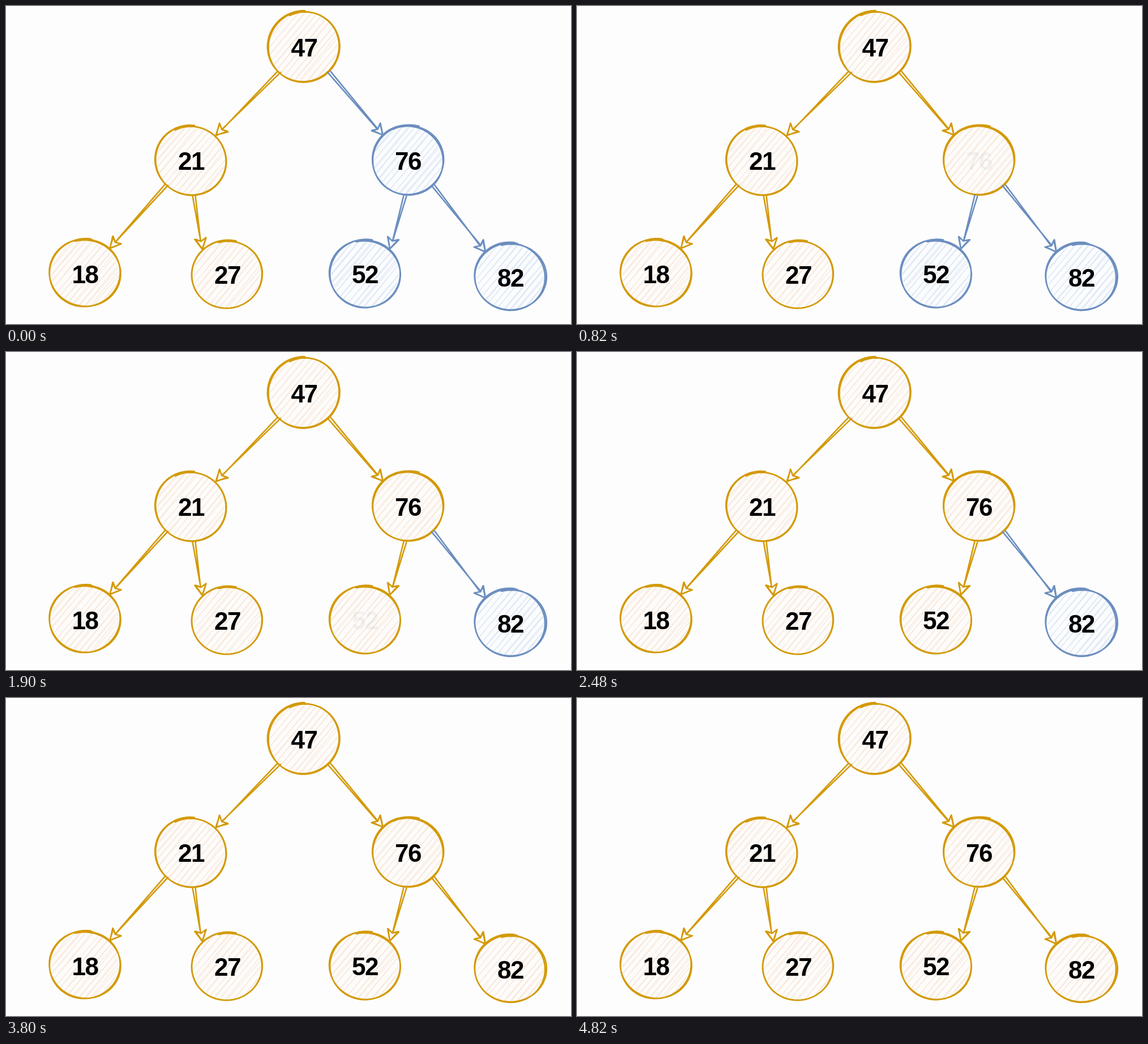
Recreate the animation shown at these times as an HTML page. Size 998 by 561 pixels, loop 4.84 s.

```html
<!DOCTYPE html>
<html lang="en">
<head>
<meta charset="utf-8">
<title>Tree traversal</title>
<style>
  html, body { margin: 0; width: 100%; height: 100%; overflow: hidden; background: #fdfdfd; }
  svg { display: block; width: 100%; height: 100%; }
  g { --line: #6c8ebf; --fill: #fbfcfd; --hatch: #dde7f6; }
  g.on { --line: #d39a08; --fill: #fdfcfb; --hatch: #f9e8da; }
  path { fill: none; stroke-linecap: round; stroke-linejoin: round; }
  ellipse { fill: var(--fill); }
  .hatch { stroke: var(--hatch); stroke-width: 1.3; }
  .line { stroke: var(--line); stroke-width: 2.6; }
  text { font: bold 44px "Liberation Sans", Arial, sans-serif; letter-spacing: -1.5px; text-anchor: middle; fill: #000; }
</style>
</head>
<body>
<svg id="stage" viewBox="0 0 998 561"></svg>
<script>
const LOOP = 4840, FADE = 500;
const RX = 62.5, HATCH_GAP = 9, HATCH_ANGLE = 50 * Math.PI / 180;
const HEAD = 19, BARB = 10, NOTCH = 14;
const stage = document.getElementById('stage');

// at: when a node is visited; nodes without it are visited from the start
const tree = {
  value: 47, x: 526.5, y: 72,
  left: {
    value: 21, x: 327, y: 272,
    left: { value: 18, x: 139.5, y: 471.5 },
    right: { value: 27, x: 391, y: 473 }
  },
  right: {
    value: 76, x: 710, y: 272, at: 720,
    left: { value: 52, x: 634, y: 472, at: 1800 },
    right: { value: 82, x: 891, y: 478, at: 3100 }
  }
};
const parts = [];

let seed = 7;
function jitter(size) {
  seed = (seed * 16807) % 2147483647;
  return (seed / 2147483647 * 2 - 1) * size;
}

function add(parent, tag, attrs = {}) {
  const el = document.createElementNS('http://www.w3.org/2000/svg', tag);
  for (const k in attrs) el.setAttribute(k, attrs[k]);
  parent.appendChild(el);
  return el;
}

function poly(points) {
  return 'M' + points.map(p => p.map(v => v.toFixed(1)).join(' ')).join('L');
}

// A hand-drawn turn that starts near the top, overshoots and drifts outwards.
function loop({ x, y }, ry) {
  const cx = x + jitter(1), cy = y + jitter(0.8);
  const phase = jitter(Math.PI), from = -1.9 + jitter(0.2), turn = 2 * Math.PI + 0.45;
  const points = [];
  for (let i = 0; i <= 72; i++) {
    const a = from + turn * i / 72;
    const k = 0.985 + 0.035 * i / 72 + 0.012 * Math.cos(2 * a + phase);
    points.push([cx + RX * k * Math.cos(a), cy + ry * k * Math.sin(a)]);
  }
  return poly(points);
}

function hatch({ x, y }, ry) {
  const ux = Math.cos(HATCH_ANGLE), uy = -Math.sin(HATCH_ANGLE);
  const at = (u, v) => [x + u * ux - v * uy, y + u * uy + v * ux];
  let d = '';
  for (let k = 6 - ry; k < ry - 3; k += HATCH_GAP) {
    for (let pass = 0; pass < 2; pass++) {
      const v = k + jitter(1.5), half = Math.sqrt(ry * ry - v * v);
      d += poly([at(jitter(2) - half, v), at(half + jitter(2), v + jitter(1.5))]);
    }
  }
  return d;
}

function shaftAndHead([ax, ay], [tx, ty]) {
  const length = Math.hypot(tx - ax, ty - ay);
  const ux = (tx - ax) / length, uy = (ty - ay) / length;
  const at = (back, side) => [tx - ux * back - uy * side, ty - uy * back + ux * side];
  let d = '';
  for (const side of [-1, 1]) {
    d += poly([at(length + jitter(2), side * 2.5), at(NOTCH, jitter(1))]);
    d += poly([at(jitter(1), 0), at(HEAD, BARB + jitter(1)), at(NOTCH, 0), at(HEAD, jitter(1) - BARB)]) + 'Z';
  }
  return d;
}

function buildNode(node, depth) {
  const ry = RX - 1.7 * depth, group = add(stage, 'g');
  add(group, 'ellipse', { cx: node.x, cy: node.y, rx: RX, ry });
  add(group, 'path', { class: 'hatch', d: hatch(node, ry) });
  add(group, 'path', { class: 'line', d: loop(node, ry) + loop(node, ry) });
  const label = add(group, 'text', { x: node.x, y: node.y + 17 });
  label.textContent = node.value;
  parts.push({ group, label, at: node.at ?? -FADE });
}

// Tips meet the child's upper inner corner; inner children hang from the parent's bottom.
function buildArrow(parent, child, side, inner) {
  const corner = RX * Math.SQRT1_2;
  const start = inner ? [parent.x + side * 5, parent.y + RX] : [parent.x + side * corner, parent.y + corner];
  const tip = [child.x - side * corner, child.y - corner];
  const group = add(stage, 'g');
  add(group, 'path', { class: 'line', d: shaftAndHead(start, tip) });
  parts.push({ group, at: child.at ?? -FADE });
}

function build(node, depth = 0, parentSide = 0) {
  buildNode(node, depth);
  for (const [child, side] of [[node.left, -1], [node.right, 1]]) {
    if (!child) continue;
    build(child, depth + 1, side);
    buildArrow(node, child, side, side === -parentSide);
  }
}

function draw(t) {
  for (const { group, label, at } of parts) {
    group.setAttribute('class', t >= at ? 'on' : '');
    if (!label) continue;
    const p = Math.min(1, (t - at) / FADE);
    label.setAttribute('opacity', t < at ? 1 : p * p);
  }
}

build(tree);
draw(0);

const start = performance.now();
function tick() {
  draw((performance.now() - start) % LOOP);
  requestAnimationFrame(tick);
}
requestAnimationFrame(tick);
</script>
</body>
</html>
```
